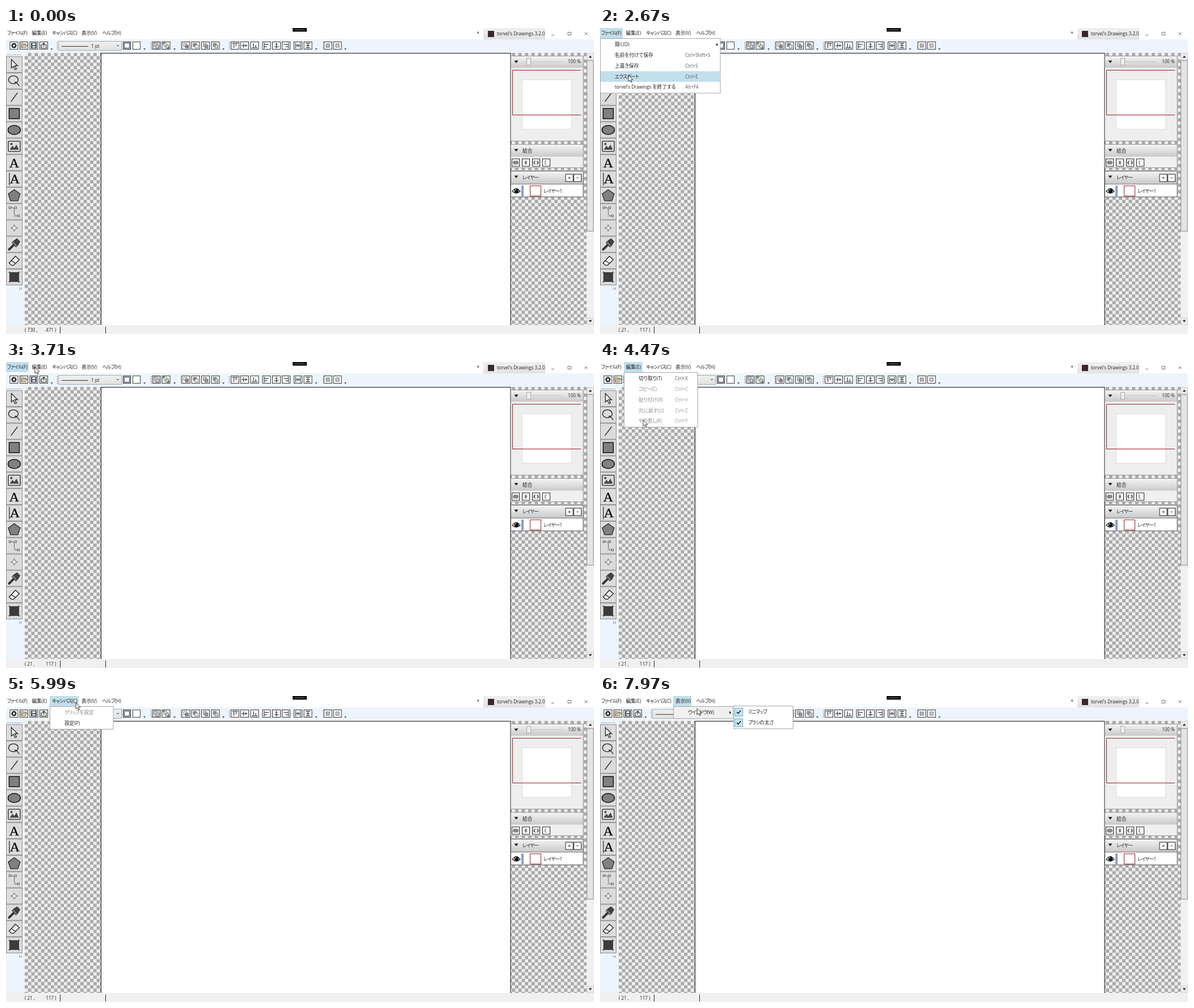
An HTML page for the animation above (8000 ms loop, 1036 by 540 pixels).

```html
<!DOCTYPE html>
<html lang="ja">
<head>
<meta charset="utf-8">
<title>Drawing editor menus</title>
<style>
html, body { margin: 0; width: 1036px; height: 540px; overflow: hidden; background: #fff; }
svg { display: block; }
text { font: 8.1px "Open Sans", "Noto Sans CJK JP", "Noto Sans CJK", sans-serif; white-space: pre; }
.j { font-size: 8.7px; font-feature-settings: "palt"; }
.k { letter-spacing: -.85px; }
.serif { font: 24px "Liberation Serif", serif; stroke: #222; stroke-width: .4px; }
</style>
</head>
<body>
<svg id="stage" width="1036" height="540" viewBox="0 0 1036 540"></svg>
<script>
const rect = (x, y, w, h, fill, stroke = 'none', more = '') =>
  `<rect x="${x}" y="${y}" width="${w}" height="${h}" fill="${fill}" stroke="${stroke}" ${more}/>`;
const path = (d, fill = 'none', stroke = '#222', width = 1, more = '') =>
  `<path d="${d}" fill="${fill}" stroke="${stroke}" stroke-width="${width}" ${more}/>`;
const ellipse = (x, y, rx, ry, fill, stroke = 'none', width = 1) =>
  `<ellipse cx="${x}" cy="${y}" rx="${rx}" ry="${ry}" fill="${fill}" stroke="${stroke}" stroke-width="${width}"/>`;
const at = (x, y, body) => `<g transform="translate(${x} ${y})">${body}</g>`;
// Text is placed by its vertical middle; Japanese runs get their own size and spacing.
const text = (x, y, s, fill = '#222', more = '') => `<text x="${x}" y="${y + 3}" fill="${fill}" ${more}>` +
  s.replace(/[ァ-ヿ]+|[ぁ-ゟ一-龠]+/g, m => `<tspan class="j${m > 'ァ' && m < '㐀' ? ' k' : ''}">${m}</tspan>`) + '</text>';

const BLUE = '#c2dfec', BAR = '#edf4fd', RED = '#9b2020';

function background() {
  return `<defs>
    <pattern id="check" x="38.76" y="44" width="11.52" height="11.52" patternUnits="userSpaceOnUse">
      ${rect(0, 0, 11.52, 11.52, '#efefef')}${path('M0 0H5.76V11.52H11.52V5.76H0Z', '#a9a9a9', 'none')}</pattern>
    <linearGradient id="head" x2="0" y2="1"><stop stop-color="#f6f6f6"/><stop offset="1" stop-color="#c9c9c9"/></linearGradient>
    <linearGradient id="combo" x2="0" y2="1"><stop stop-color="#f0f0f0"/><stop offset="1" stop-color="#e2e2e2"/></linearGradient>
    </defs>` +
    rect(0, 0, 1036, 540, '#fff') + rect(0, 20, 1036, 24, BAR) + rect(0, 44, 33, 480, BAR) +
    rect(33, 44, 990, 480, 'url(#check)') +
    rect(167.5, 44.5, 721.5, 490, '#fff', '#111') +
    rect(0, 524, 1036, 16, '#f0f0f0') + path('M95.5 527V539M175.5 527V539') +
    text(33, 533, '', '#222', 'id="statusX"') + text(70, 533, '', '#222', 'id="statusY"') + text(86, 533, ')');
}

function titleBar() {
  const names = [[2, 'ファイル(F)'], [45.5, '編集(E)'], [81, 'キャンバス(C)'], [133, '表示(V)'], [169.5, 'ヘルプ(H)']];
  return rect(0, 0, 40, 18, BLUE, 'none', 'id="header"') + names.map(([x, s]) => text(x, 8.5, s)).join('') +
    rect(505, 0, 25, 6.5, '#111') + path('M509 3H526', 'none', '#766') +
    text(829.5, 10, '*') + rect(841, 0, 109, 20, 'url(#combo)') +
    rect(849, 5, 11, 11, '#3a2830') + text(865, 10, "torvel's Drawings 3.2.0") +
    path('M961 12.5H966M990 7.5H995.5V12.5H990ZM1019.5 7.5L1024.5 12.5M1024.5 7.5L1019.5 12.5', 'none', '#777');
}

// Small toolbar pictures, drawn around their centre.
const bars = d => path(d, 'none', '#555', 1.5);
const stack = (a, b) => rect(-4, -4, 5.5, 5.5, a, '#666', 'stroke-width=".8"') + rect(-1, -1, 5.5, 5.5, b, '#666', 'stroke-width=".8"');
const smallIcons = [
  [14, ellipse(0, 0, 3, 3, 'none', '#222', 2) + path('M0-5V-3M0 3V5M-5 0H-3M3 0H5M-3.5-3.5L-2-2M2 2L3.5 3.5M3.5-3.5L2-2M-2 2L-3.5 3.5', 'none', '#222', 1.5)],
  [31.5, path('M-5 4V-4H-1L0-3H4V-1M-5 4L-2-1H6L3 4Z', '#dccb9f', '#665', .9)],
  [49, rect(-4.5, -4.5, 9, 9, '#566478', '#333') + rect(-2.5, -4, 5, 3, '#fff') + rect(-2.5, 1, 5, 3, '#ddd')],
  [66.5, path('M-2-1H-4.5V4.5H4.5V-1H2M0 2V-4.5M-2.5-2L0-4.5L2.5-2', 'none', '#222', 1.2)],
  [265, stack('#ddd', '#ccc') + rect(-5, -5, 10, 10, 'none', '#444', 'stroke-dasharray="2 1.3"')],
  [282, stack('#eee', '#ccc') + path('M-5-2V-5H-2M2 5H5V2')],
  [317, stack('#eee', '#888')], [334, stack('#888', '#eee')], [351.5, stack('#ccc', '#999')], [369, stack('#999', '#ccc')],
  [403.5, bars('M-5-4H5M-2-3V4M2-3V1')], [420.5, bars('M-5 0H5M-2-4V4M2-2V2')], [438, bars('M-5 4H5M-2-4V3M2-1V3')],
  [459, bars('M-4-5V5M-3-2H4M-3 2H1')], [476.5, bars('M0-5V5M-2-2H2M-4 2H4')], [493.5, bars('M4-5V5M-4-2H3M-1 2H3')],
  [514.5, bars('M-4-5V5M0-3V3M4-5V5M-4 0H4')], [532, bars('M-4-4H4M-3 0H3M-4 4H4M0-4V4')],
  [567, rect(-3, -3, 6, 6, '#bbb', '#777')], [584, rect(-3, -3, 6, 6, '#ccc', '#777')]
];

function toolbar() {
  const overflow = [80.5, 244, 297, 383, 546.5, 598];
  const grips = [90.5, 255.5, 308.5, 393.5, 560.5];
  return rect(92.5, 23.5, 111, 16, 'url(#combo)', '#aaa') + path('M98 32.5H145', 'none', '#333') +
    text(150, 32, '1 pt') + path('M195 30L197 32L199 30') +
    rect(206.5, 24.5, 13, 13, '#fff', '#111') + rect(208.5, 26.5, 9, 9, '#fff', '#223') +
    rect(223.5, 24.5, 13, 13, '#fff', '#444') +
    smallIcons.map(([x, icon]) => at(x, 31, rect(-7, -6.5, 14, 13, '#fff', '#333') + icon)).join('') +
    overflow.map(x => path(`M${x - 2} 36H${x + 2}L${x} 39Z`, '#555', 'none')).join('') +
    grips.map(x => path(`M${x} 25V38`, 'none', '#567', 1.2, 'stroke-dasharray="1.2 1.7"')).join('');
}

function toolbox() {
  const icons = [
    path('M-5-9V6L-1.5 3L1.5 9L4 8L1 2H6Z', '#eee', '#222', 1.3),
    ellipse(-1.5, -2, 8.5, 7, 'none', '#222', 1.4) + path('M2 4C0 2 3 1 5 4L9 9', 'none', '#222', 1.3),
    path('M-6 8L6-8', 'none', '#222', 1.4),
    rect(-9, -9, 18, 18, '#808080', '#111', 'stroke-width="1.5"'),
    ellipse(0, 0, 11, 8, '#808080', '#111', 1.5),
    rect(-10.5, -9, 21, 18, '#ddd', '#444', 'rx="1.5" stroke-width="1.6"') + path('M-8 6L-3-1L0 3L4-3L8 6Z', '#444', 'none') + ellipse(-5, -4, 2, 2, '#444'),
    '<text class="serif" x="0" y="8" text-anchor="middle">A</text>',
    '<text class="serif" x="1" y="8" text-anchor="middle">A</text>' + path('M-8.5-11V11', 'none', '#222', 1.2),
    path('M0-10L10.5-2.5L6.5 9.5H-6.5L-10.5-2.5Z', '#808080', '#222', 1.2),
    path('M-7-7C8-9-8 10 8 7', 'none', '#555') + path('M-7-7H3M-2 8H8', 'none', '#888', .7) +
      rect(-9, -8.5, 3, 3, '#fff', '#555') + rect(1, -8.5, 3, 3, '#fff', '#555') + rect(6, 6, 3, 3, '#fff', '#555'),
    path('M0-6L1.6-1.6L6 0L1.6 1.6L0 6L-1.6 1.6L-6 0L-1.6-1.6Z', '#fff', '#666'),
    path('M-9 9L-1 1', 'none', '#333', 4, 'stroke-linecap="round"') + path('M-4-3L3 5L6 2L-1-6Z', '#777', '#222') +
      path('M-1-6L5-10L10-5L6 2Z', '#444', '#222'),
    path('M-9 4L2-8L9-2L-1 8H-5ZM-5 0L3 5', '#eee', '#222', 1.3),
    rect(-8, -8, 16, 16, '#3c3c3c') + path('M-10-8H10M-10 8H10M-8-10V10M8-10V10', 'none', '#333')
  ];
  return path('M2 47.5H28', 'none', '#456', 1.2, 'stroke-dasharray="1.2 1.7"') +
    icons.map((icon, i) => at(14.5, 64.5 + 28.85 * i, rect(-14, -14, 28, 28, '#dcdcdc', '#8c8c8c') + icon)).join('') +
    path('M23 458L25 460L23 462M27 458V462', 'none', '#666', .8);
}

function panels() {
  const head = (y, h, s) => rect(889, y, 128, h, 'url(#head)') + path(`M895.5 ${y + 8.5}H902.5L899 ${y + 13}Z`, '#111', 'none') + text(910, y + 12, s);
  const button = (x, y, body) => at(x, y, rect(-6.5, -6.5, 13, 13, '#fff', '#222') + body);
  const frame = (y, h) => rect(889.5, y + .5, 127.5, h, 'none', '#999');
  return rect(889, 49, 128, 151, '#eee') + head(49, 21, '') +
    path('M925 59.5H979', 'none', '#c4c4c4') + rect(917.5, 53.5, 7, 12, '#eee', '#aaa') + text(990, 59, '100 %') +
    rect(909.5, 91.5, 87, 87, '#fff', '#ddd') +
    path('M1013 74.5H892.5V153.5H1013', 'none', RED) + frame(49, 150) +
    rect(889, 205, 128, 42, '#f0f0f0') + head(205, 22, '結合') +
    button(898, 237.5, ellipse(-1.5, 0, 3.5, 3.5, '#888') + ellipse(1.5, 0, 3.5, 3.5, '#888')) +
    button(916, 237.5, path('M0-4Q4 0 0 4Q-4 0 0-4Z', '#777', 'none')) +
    button(934, 237.5, ellipse(-1.5, 0, 3.5, 3.5, '#777') + ellipse(1.5, 0, 3.5, 3.5, '#777') + path('M0-4Q4 0 0 4Q-4 0 0-4Z', '#fff', 'none')) +
    button(952, 237.5, path('M1-4A4 4 0 1 0 1 4Q-4 0 1-4Z', '#777', 'none')) + frame(205, 41) +
    rect(889, 252, 128, 46, '#fff') + head(252, 23, 'レイヤー') +
    button(992.5, 264.5, path('M-2 0H2M0-2V2', 'none', '#222', .9)) + button(1007, 264.5, path('M-1.5 0H1.5')) +
    path('M892 288Q899 279 906 288Q899 295 892 288Z', '#fff', '#111', 1.2) + ellipse(899.5, 287, 4, 4.3, '#111') + ellipse(898, 285.5, 1, 1, '#fff') +
    rect(908, 278, 4, 19, '#8c9ccb') + rect(923.5, 278.5, 19, 18, '#fff', RED) + text(947, 287.5, 'レイヤー1') +
    path('M889 275.5H1017', 'none', '#777') + rect(889.5, 252.5, 127.5, 45.5, 'none', '#555');
}

function scrollbar() {
  return rect(1023, 44, 13, 480, '#f0f0f0') + rect(1023.5, 45, 12, 11, '#eee', '#ccc') + rect(1023.5, 512, 12, 11, '#eee', '#ccc') +
    rect(1023.5, 57.5, 11.5, 301, '#e4e4e4', '#8f8f8f') +
    path('M1026.5 52.5H1032.5L1029.5 48.5ZM1026.5 515.5H1032.5L1029.5 519.5Z', '#333', 'none');
}

const TOP = 19.8, ROW = 18.8;
// Items: label, shortcut, disabled. "▸" marks a submenu.
const menus = [
  { x: 0, w: 212, head: 40, keyX: 150, from: 1920, to: 3650, headFrom: 1640, headTo: 3790, items: [['開く(O)', '▸'], ['名前を付けて保存', 'Ctrl+Shift+S'],
    ['上書き保存', 'Ctrl+S'], ['エクスポート', 'Ctrl+E'], ["torvel's Drawings を終了する", 'Alt+F4']] },
  { x: 42, w: 130, head: 33, keyX: 132, from: 3790, to: 5550, items: [['切り取り(T)', 'Ctrl+X'], ['コピー(C)', 'Ctrl+C', 1],
    ['貼り付け(P)', 'Ctrl+V', 1], ['元に戻す(U)', 'Ctrl+Z', 1], ['やり直し(R)', 'Ctrl+Y', 1]] },
  { x: 77, w: 112, head: 51, from: 5550, to: 6270, items: [['クリップを設定', '', 1], ['設定(P)', '']] },
  { x: 129, w: 106, head: 32, from: 6270, to: 8000, plain: true, items: [['ウインドウ(W)', '▸']] },
  { x: 235, w: 105, y: -.8, from: 6890, to: 8000, plain: true, checks: true, items: [['ミニマップ', ''], ['ブラシの太さ', '']] }
];

function popup(m, i) {
  const rows = m.items.map(([label, key, off], r) => {
    const y = TOP + ROW * (r + .5), ink = off ? '#8a8a8a' : '#222';
    const arrow = m.x + m.w - 7;
    return text(m.x + 26, y, label, ink) +
      (key === '▸' ? path(`M${arrow} ${y - 2.7}L${arrow + 3.2} ${y}L${arrow} ${y + 2.7}Z`, '#222', 'none') : text(m.keyX || 0, y, key, off ? '#999' : '#556')) +
      (m.checks ? rect(m.x + 2.5, y - 7, 14, 14, '#c8e4f2', '#5aabd2') + path(`M${m.x + 6} ${y}L${m.x + 8.5} ${y + 2.5}L${m.x + 13} ${y - 3}`, 'none', '#222', 1.6) : '');
  }).join('');
  return `<g id="menu${i}" transform="translate(0 ${m.y || 0})">` +
    rect(m.x + .5, 18.5, m.w - .5, m.items.length * ROW + 2.5, m.plain && !m.checks ? '#f0f0f0' : '#fff', '#a5a5a5') +
    rect(m.x + 1, 0, m.w - 1.5, ROW, BLUE, 'none', 'class="hover"') + rows + '</g>';
}

const byId = id => document.getElementById(id);
byId('stage').innerHTML = background() + titleBar() + toolbar() + toolbox() + panels() + scrollbar() +
  menus.map(popup).join('') +
  `<g id="cursor">${path('M0 0V11L2.6 8.7L4.4 12.8L6.2 12L4.5 8H8Z', '#fff', '#111', .8)}</g>`;
const layers = menus.map((m, i) => byId('menu' + i));

// Pointer path: time, x, y
const route = [
  [330, 786, 330], [700, 430, 79], [960, 236, 140], [1160, 236, 140], [1400, 182.1, 128.2], [1560, 70, 50],
  [1720, 24, 14], [2390, 24, 14], [2670, 50, 83], [2850, 52, 107], [3290, 52, 107], [3560, 52, 30],
  [3710, 51, 9], [4120, 51, 9], [4470, 76, 102], [4640, 78, 115], [4890, 80, 100], [4960, 80, 100],
  [5300, 95, 40], [5650, 104, 9], [5850, 104, 9], [5990, 123, 12], [6300, 145, 10], [6620, 152, 14],
  [6750, 152, 14], [7100, 164, 24], [7430, 164, 24], [7570, 168, 22], [7830, 168, 22], [7970, 171, 22], [8000, 171, 22]
];
function pointer(t) {
  const n = Math.max(1, route.findIndex(k => k[0] >= t));
  const [t0, x0, y0] = route[n - 1], [t1, x1, y1] = route[n];
  const p = Math.max(0, (t - t0) / (t1 - t0));
  return [x0 + (x1 - x0) * p, y0 + (y1 - y0) * p];
}

function draw() {
  const t = performance.now() % 8000;
  const [x, y] = pointer(t);
  byId('cursor').setAttribute('transform', `translate(${x} ${y})`);
  byId('cursor').style.display = t < 330 ? 'none' : '';

  // Canvas coordinates stop updating once the pointer leaves the page.
  const [px, py] = pointer(Math.min(t, 1400));
  const [cx, cy] = t < 330 ? [730, 471] : [(px - 167) / .72, (py - 44) / .72].map(Math.round);
  byId('statusX').textContent = `( ${cx} ,`;
  byId('statusY').textContent = cy;

  const open = menus.find(m => m.head && t >= (m.headFrom || m.from) && t < (m.headTo || m.to));
  const header = byId('header');
  header.style.display = open ? '' : 'none';
  if (open) {
    header.setAttribute('x', open.x);
    header.setAttribute('width', open.head);
  }
  menus.forEach((m, i) => {
    const row = Math.floor((y - TOP) / ROW), item = m.items[row];
    const hover = layers[i].querySelector('.hover');
    layers[i].style.display = t >= m.from && t < m.to ? '' : 'none';
    layers[i].style.opacity = Math.min(1, Math.max(0, (t - m.from + 30) / 150));
    hover.style.display = item && !item[2] && !m.plain ? '' : 'none';
    hover.setAttribute('y', TOP + ROW * row);
  });
  requestAnimationFrame(draw);
}
draw();
</script>
</body>
</html>
```
